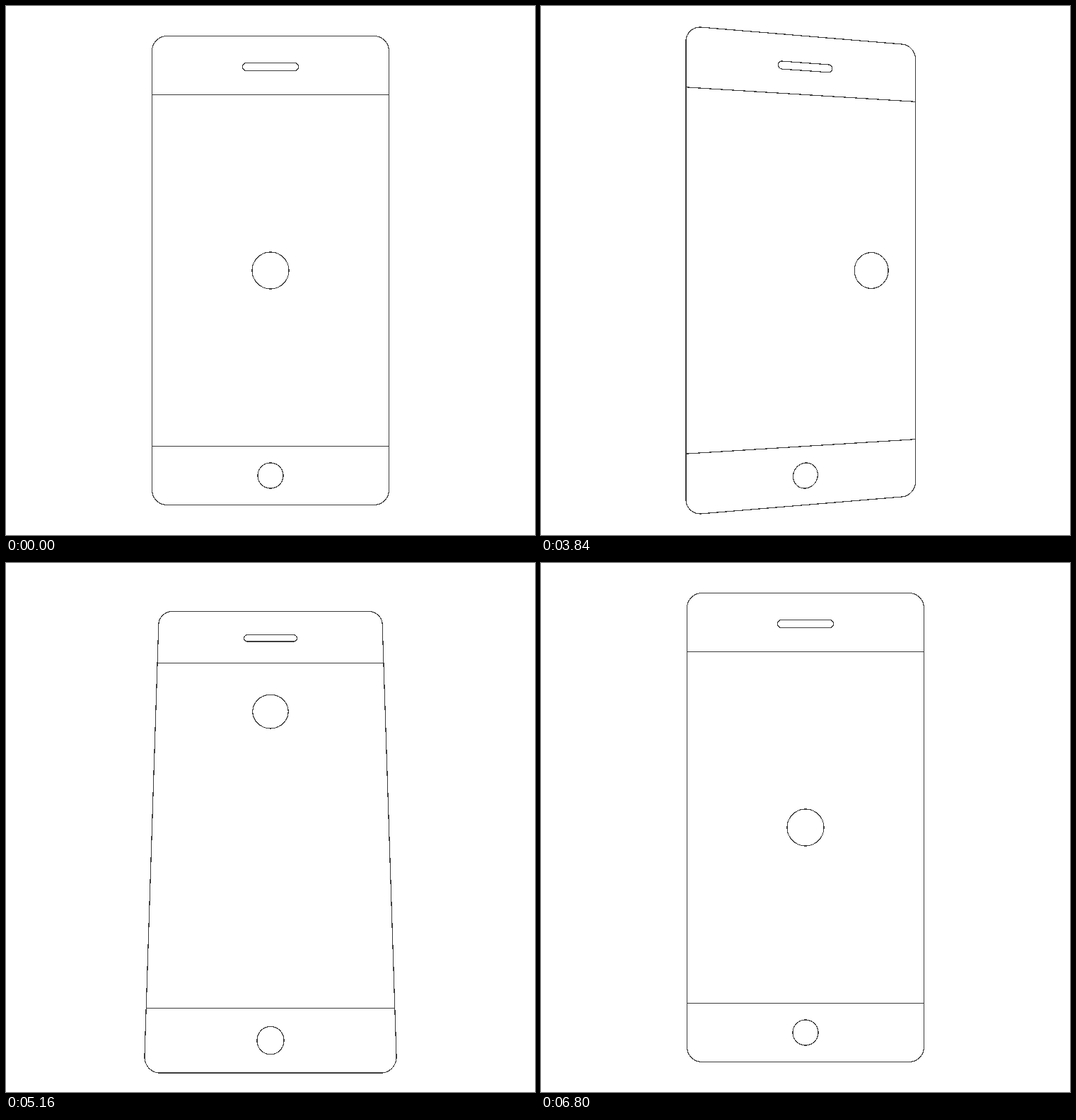
These frames come from a looping animation (748 by 748 pixels, 7.8 s). An HTML page:

```html
<!DOCTYPE html>
<html lang="en">
<head>
<meta charset="utf-8">
<title>Tilting phone</title>
<style>
  html, body { margin: 0; width: 100%; height: 100%; overflow: hidden; background: #fff; }
  svg { display: block; width: 100%; height: 100%; }
  path { fill: none; stroke: #3c3c3c; stroke-width: 1.2; shape-rendering: crispEdges; }
</style>
</head>
<body>
<svg viewBox="0 0 748 748"><path id="phone"/></svg>
<script>
const LOOP = 7800, START = 2760, STEP = 40, STEPS = 101;
const CENTER = 374, DEPTH = 1024, SPAN = 16.6;
const MAX = { yaw: 20, pitch: 15, x: 125, y: 208 };

// Targets in order: left, right, flat, up, down, flat.
const SIDE = [-1, 1, 0, 0, 0, 0];
const LENGTH = [0, 0, 0, -1, 1, 0];
const BALL_STARTS = [0.3, 16.8, 34.8, 51.2, 68, 85];
const TILT_STARTS = [0.2, 17.5, 35.6, 52.5, 68.8, 85];

const phone = document.getElementById('phone');
const radians = deg => deg * Math.PI / 180;

// The standard "ease" curve: cubic-bezier(.25, .1, .25, 1).
function ease(t) {
  if (t <= 0) return 0;
  if (t >= 1) return 1;
  const curve = (u, a, b) => 3 * (1 - u) * (1 - u) * u * a + 3 * (1 - u) * u * u * b + u * u * u;
  let lo = 0, hi = 1;
  for (let i = 0; i < 24; i++) {
    const mid = (lo + hi) / 2;
    if (curve(mid, 0.25, 0.25) < t) lo = mid; else hi = mid;
  }
  return curve(lo, 0.1, 1);
}

function follow(step, starts, targets) {
  let value = 0;
  starts.forEach((start, i) => {
    value += (targets[i] - value) * ease((step - start) / SPAN);
  });
  return value;
}

function arc(cx, cy, r, from, to, parts) {
  return Array.from({ length: parts + 1 }, (_, i) => {
    const a = radians(from + (to - from) * i / parts);
    return [cx + r * Math.cos(a), cy + r * Math.sin(a)];
  });
}

const circle = (cx, cy, r) => arc(cx, cy, r, 0, 360, 72);

function roundRect(cx, cy, w, h, r) {
  const x = w / 2 - r, y = h / 2 - r;
  return [
    ...arc(cx + x, cy + y, r, 0, 90, 16),
    ...arc(cx - x, cy + y, r, 90, 180, 16),
    ...arc(cx - x, cy - y, r, 180, 270, 16),
    ...arc(cx + x, cy - y, r, 270, 360, 16)
  ];
}

// Shapes are measured from the middle of the phone.
const body = [
  roundRect(0, 0, 335, 663, 21),
  roundRect(0, -288, 79, 11, 5.5),
  circle(0, 290, 18),
  [[-167.5, -248.5], [167.5, -248.5]],
  [[-167.5, 248.5], [167.5, 248.5]]
];

function draw(step) {
  const active = step >= 1 && step < STEPS;
  const at = (starts, targets) => active ? follow(step, starts, targets) : 0;
  const yaw = radians(MAX.yaw * at(TILT_STARTS, SIDE));
  const pitch = radians(MAX.pitch * at(TILT_STARTS, LENGTH));
  const ball = circle(MAX.x * at(BALL_STARTS, SIDE), MAX.y * at(BALL_STARTS, LENGTH), 26);

  const project = ([x, y]) => {
    const scale = 1 / (1 + (x * Math.sin(yaw) + y * Math.sin(pitch)) / DEPTH);
    const px = CENTER + x * Math.cos(yaw) * scale;
    const py = CENTER + y * Math.cos(pitch) * scale;
    return px.toFixed(3) + ' ' + py.toFixed(3);
  };
  const outline = shape =>
    'M' + shape.map(project).join('L') + (shape.length > 2 ? 'Z' : '');
  phone.setAttribute('d', [...body, ball].map(outline).join(''));
}

function tick() {
  draw(Math.floor((performance.now() % LOOP - START) / STEP));
  requestAnimationFrame(tick);
}
tick();
</script>
</body>
</html>
```
